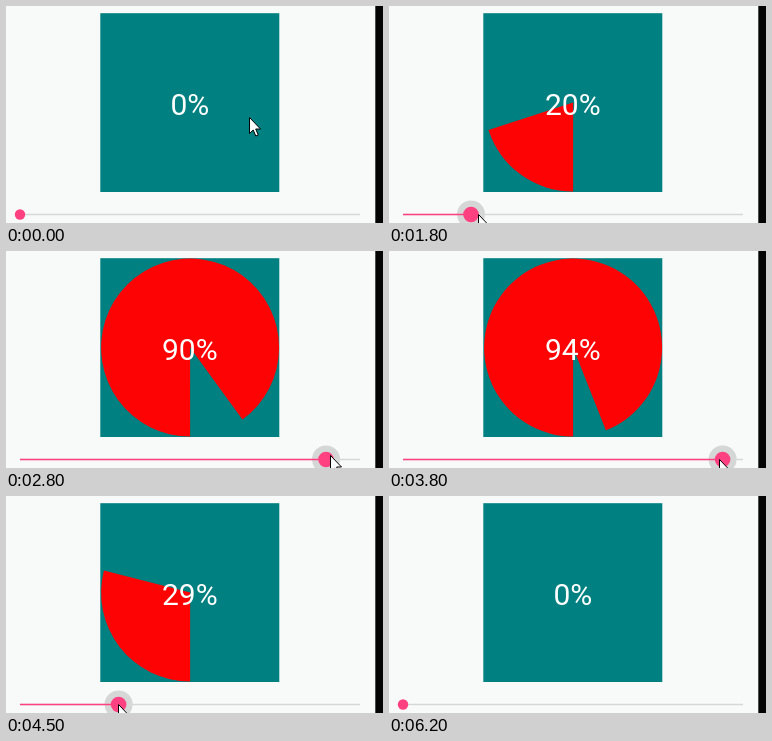
These frames come from a looping animation (377x217 px, 6.7 s). An HTML page:

```html
<!DOCTYPE html>
<html lang="en">
<head>
<meta charset="utf-8">
<title>Pie progress</title>
<style>
  html, body { margin: 0; width: 100%; height: 100%; overflow: hidden; background: #f8fafa; }
  svg { display: block; }
  text { font: 30px Roboto, Arial, sans-serif; fill: #fff; text-anchor: middle; }
</style>
</head>
<body>
<svg width="377" height="217" viewBox="0 0 377 217">
  <rect width="377" height="217" fill="#f8fafa"/>
  <rect x="369.3" width="8" height="217" fill="#040404"/>
  <rect x="94.3" y="7.2" width="179" height="178.8" fill="#008080"/>
  <path id="pie" fill="#fd0303"/>
  <text id="label" x="183.8" y="108.6">0%</text>
  <circle id="halo" cy="208.5" r="14" fill="#000"/>
  <path d="M14 208.5H354" stroke="#d6d8d8" stroke-width="1.6"/>
  <path id="done" stroke="#ff4081" stroke-width="1.6"/>
  <circle id="thumb" cy="208.5" fill="#ff4081"/>
  <path id="cursor" d="M.5 .5V16.5L4.2 13L6.8 19L9.3 18L6.7 12H11.5Z" fill="#fff" stroke="#000"/>
</svg>
<script>
const LOOP = 6700, STEP = 100;
const PRESS = 1300, RELEASE = 5700;
const [pie, label, halo, done, thumb, cursor] =
  ['pie', 'label', 'halo', 'done', 'thumb', 'cursor'].map(id => document.getElementById(id));

const clamp = v => Math.min(1, Math.max(0, v));
const ease = u => (1 - Math.cos(Math.PI * clamp(u))) / 2;

// Each key is a time followed by its values
function along(keys, t) {
  const i = keys.findIndex(key => key[0] > t);
  if (i < 0) return keys[keys.length - 1].slice(1);
  const [t0, ...from] = keys[Math.max(0, i - 1)];
  const [t1, ...to] = keys[i];
  const k = i ? (t - t0) / (t1 - t0) : 0;
  return from.map((v, n) => v + (to[n] - v) * k);
}

const fall = [[3500, 100], [3800, 94], [4200, 54], [4500, 29], [4900, 11], [5400, 7], [5500, 0]];

// Pointer before the drag: x, y
const approach = [[0, 243, 111], [500, 25, 204], [600, 25, 204], [800, 14, 208]];

// Pointer during the drag: offset from the thumb, y
const grip = [
  [1300, 1, 209], [1800, 7, 208], [2800, 4, 204], [3800, -4, 208],
  [4500, -1, 208], [5400, -14, 212], [5800, -8, 220]
];

function percentAt(t) {
  return Math.floor(t < 3500 ? 100 * ease((t - 1200) / 2000) : along(fall, t)[0]);
}

function piePath(p) {
  const cx = 184.1, cy = 96.6, r = 89;
  if (p <= 0) return '';
  const a = Math.PI / 2 + Math.min(p, 99.99) / 50 * Math.PI;
  const x = cx + r * Math.cos(a), y = cy + r * Math.sin(a);
  return `M${cx} ${cy}V${cy + r}A${r} ${r} 0 ${p > 50 ? 1 : 0} 1 ${x} ${y}Z`;
}

function draw(t) {
  const p = percentAt(t), x = 14 + 3.4 * p;
  const dragging = t >= PRESS;
  const pressed = dragging ? 1 - clamp((t - RELEASE) / 300) : 0;

  pie.setAttribute('d', piePath(p));
  label.textContent = p + '%';
  done.setAttribute('d', `M14 208.5H${x}`);
  thumb.setAttribute('cx', x);
  thumb.setAttribute('r', 5.2 + 2.6 * pressed);
  halo.setAttribute('cx', x);
  halo.setAttribute('opacity', t > PRESS ? 0.14 * pressed : 0);

  const [px, py] = along(dragging ? grip : approach, t);
  const left = Math.round(dragging ? x + px : px);
  cursor.setAttribute('transform', `translate(${left} ${Math.round(py)})`);
}

const origin = performance.now();
function tick() {
  const t = (performance.now() - origin) % LOOP;
  draw(Math.floor(t / STEP) * STEP);
  requestAnimationFrame(tick);
}
tick();
</script>
</body>
</html>
```
